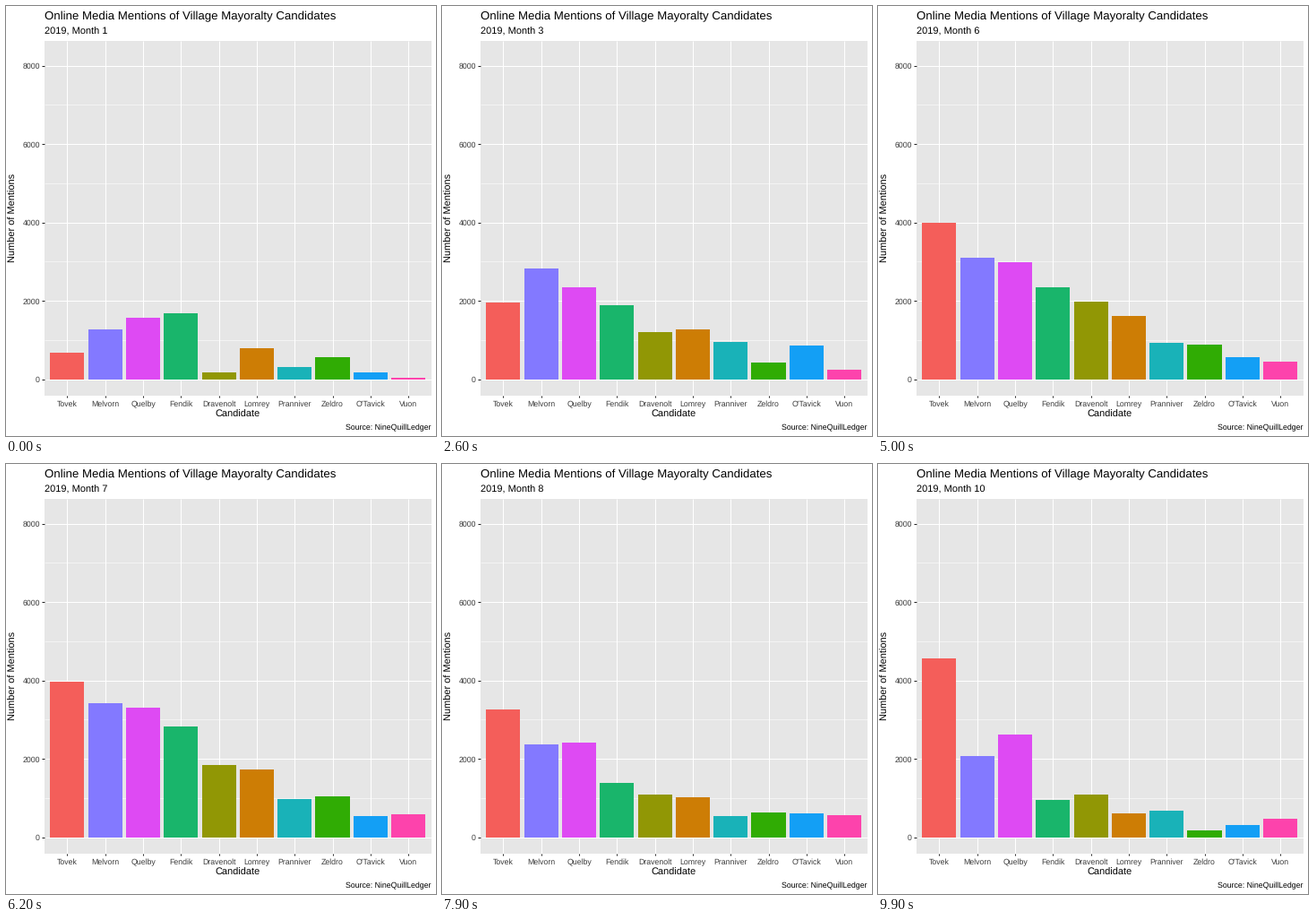
A matplotlib script that plays this animation: 480 by 480 pixels, repeating every 10 s.

```python
import numpy as np
import matplotlib.pyplot as plt
from matplotlib.animation import FuncAnimation
from matplotlib.patches import Rectangle

plt.rcParams.update({"font.family": "Liberation Sans", "text.hinting": "none"})

SIZE, DPI = 480, 72
FRAMES, INTERVAL = 100, 100
STEPS = 11  # frames from one month to the next

LEFT, RIGHT, TOP, BOTTOM = 43, 474.5, 39, 434.6
PEAK = 8219  # tallest bar, sets the vertical scale
ZERO = BOTTOM - (BOTTOM - TOP) / 22
UNIT = (RIGHT - LEFT) / 10.2

PANEL, TICK, LABEL = "#e6e6e6", "#262626", "#3c3c3c"

# name, colour, mentions in months 1 to 10
CANDIDATES = [
    ("Tovek", "#f45e5a", [685, 951, 1900, 2033, 2950, 4864, 3459, 2160, 8219, 4563]),
    ("Melvorn", "#8379ff", [1277, 1985, 2900, 2700, 2394, 3695, 3267, 2144, 3400, 2076]),
    ("Quelby", "#de4af3", [1573, 1917, 2500, 2100, 2097, 3734, 3066, 2067, 4000, 2624]),
    ("Fendik", "#19b56b", [1688, 1759, 2000, 1700, 1426, 3121, 2662, 1324, 1700, 958]),
    ("Dravenolt", "#919705", [182, 196, 900, 1750, 1426, 2451, 1503, 1005, 1500, 1095]),
    ("Lomrey", "#cd7d05", [800, 1139, 1400, 1050, 963, 2169, 1483, 978, 1250, 616]),
    ("Pranniver", "#19b2b8", [320, 956, 1050, 750, 672, 1156, 882, 456, 960, 685]),
    ("Zeldro", "#30ac04", [570, 313, 420, 430, 393, 1305, 904, 571, 950, 183]),
    ("O'Tavick", "#139ff5", [182, 277, 1100, 427, 396, 715, 452, 553, 900, 320]),
    ("Vuon", "#fd43ac", [40, 65, 228, 255, 205, 665, 552, 510, 840, 480]),
]


def y_at(value):
    return ZERO - value * (BOTTOM - TOP) / 1.1 / PEAK


def x_at(i):
    return LEFT + (i + 0.6) * UNIT


fig = plt.figure(figsize=(SIZE / DPI, SIZE / DPI), dpi=DPI, facecolor="white")
ax = fig.add_axes([0, 0, 1, 1])
ax.set_xlim(0, SIZE)
ax.set_ylim(SIZE, 0)
ax.axis("off")


def line(x0, y0, x1, y1, color="white", width=1.07):
    ax.plot([x0, x1], [y0, y1], color=color, lw=width,
            solid_capstyle="butt", zorder=2)


def text(x, y, s, size, color="black", ha="left", **kw):
    return ax.text(x, y, s, fontsize=size, color=color, ha=ha,
                   va="baseline", **kw)


ax.add_patch(Rectangle((LEFT, TOP), RIGHT - LEFT, BOTTOM - TOP,
                       fc=PANEL, lw=0, zorder=1))

for v in range(1000, 8000, 2000):
    line(LEFT, y_at(v), RIGHT, y_at(v), width=0.53)
for v in range(0, 8001, 2000):
    y = y_at(v)
    line(LEFT, y, RIGHT, y)
    line(LEFT - 2.75, y, LEFT, y, TICK)
    text(38, y + 3.4, str(v), 8.8, LABEL, "right")

bars = []
for i, (name, color, _) in enumerate(CANDIDATES):
    x = x_at(i)
    line(x, TOP, x, BOTTOM)
    line(x, BOTTOM, x, BOTTOM + 2.75, TICK)
    text(x, 447, name, 8.8, LABEL, "center")
    bar = Rectangle((x - 0.45 * UNIT, ZERO), 0.9 * UNIT, 0,
                    fc=color, lw=0, zorder=3)
    bars.append(ax.add_patch(bar))

text(LEFT, 15, "Online Media Mentions of Village Mayoralty Candidates", 13.2)
subtitle = text(LEFT, 32, "", 11)
text((LEFT + RIGHT) / 2, 459, "Candidate", 11, ha="center")
text(RIGHT, 473, "Source: NineQuillLedger", 8.8, ha="right")
ax.text(13, (TOP + BOTTOM) / 2, "Number of Mentions", fontsize=11,
        rotation=90, ha="right", va="center")

months = np.arange(1, 11)


def update(frame):
    month = 1 + frame / STEPS
    for bar, (_, _, counts) in zip(bars, CANDIDATES):
        top = y_at(np.interp(month, months, counts))
        bar.set_y(top)
        bar.set_height(ZERO - top)
    subtitle.set_text(f"2019, Month {round(month)}")
    return [*bars, subtitle]


anim = FuncAnimation(fig, update, frames=FRAMES, interval=INTERVAL,
                     repeat=True, repeat_delay=0)
plt.show()
```
